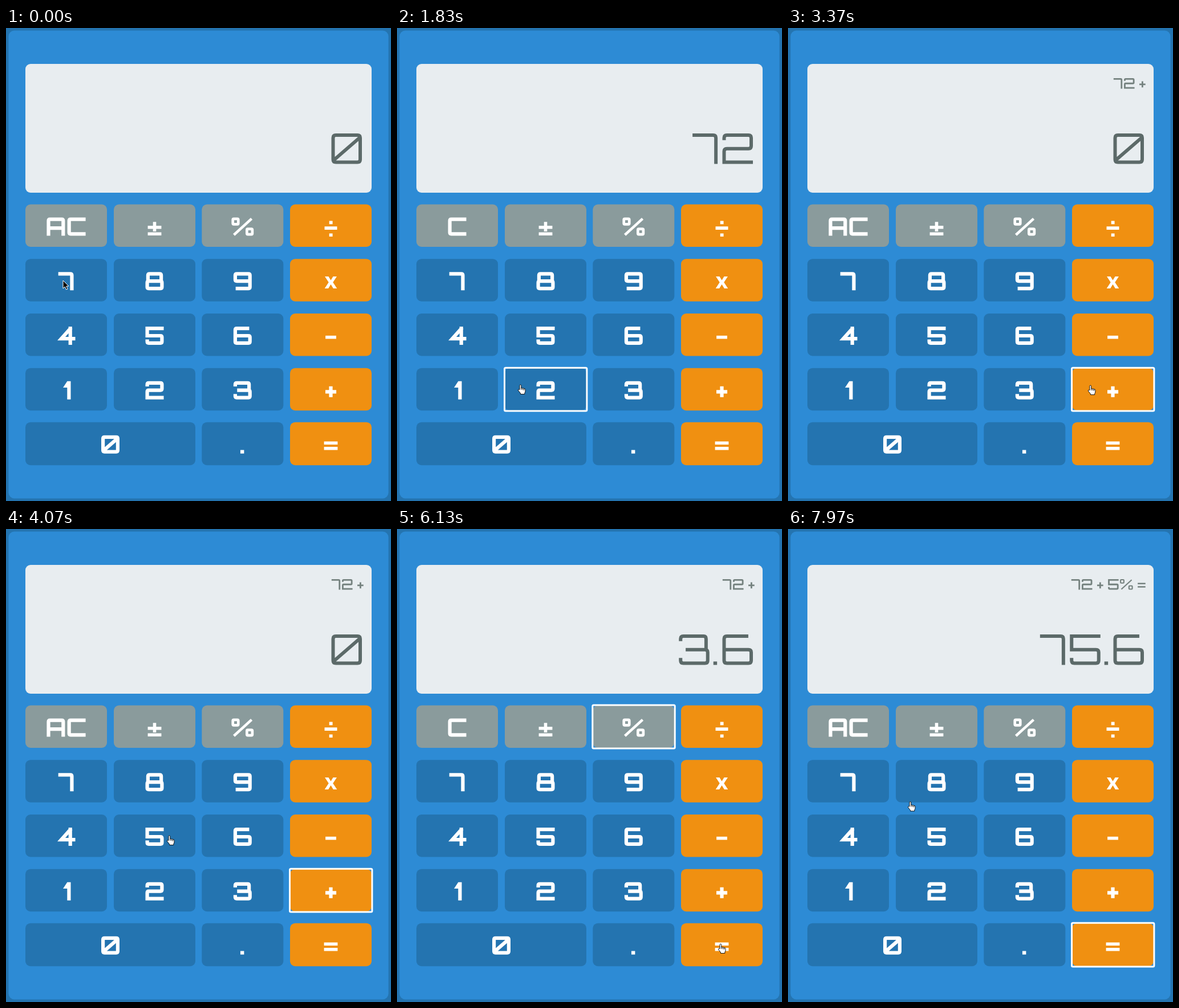
Write an HTML page that moves like this. It is 675 px wide and 830 px high and loops after 8 s.

```html
<!DOCTYPE html>
<html lang="en">
<head>
<meta charset="utf-8">
<title>Calculator</title>
<style>
html, body { margin: 0; width: 100%; height: 100%; overflow: hidden; background: #2474b0; }
svg { display: block; width: 100%; height: 100%; }
.ink { fill: none; stroke-linecap: square; stroke-miterlimit: 6; }
text { font: 700 38px "Open Sans", "Noto Sans", sans-serif; fill: #fff; text-anchor: middle; }
</style>
</head>
<body>
<svg viewBox="0 0 675 830">
  <rect width="675" height="830" fill="#2474b0"/>
  <rect x="4.5" y="4.5" width="666" height="821" rx="10" fill="#2d8bd5"/>
  <rect x="34" y="63" width="607" height="226" rx="9" fill="#e8edf0"/>
  <g id="history"></g>
  <g id="display"></g>
  <g id="keys"></g>
  <g id="clear"></g>
  <rect id="focus" fill="none" stroke="#fff" stroke-width="3" rx="2"/>
  <g id="pointer">
    <g id="press" fill="none">
      <circle r="26" stroke="#fff" stroke-opacity=".6" stroke-width="5"/>
      <circle r="26" stroke="#000" stroke-width="2.6"/>
    </g>
    <path id="arrow" d="M0 0V14L3.3 11 5.5 16 8 15 5.8 10H10Z" fill="#000" stroke="#fff"/>
    <g id="hand" stroke="#000" stroke-width=".9">
      <path fill="#fff" d="M-2 8.5V1.5a1.4 1.4 0 0 1 2.8 0V6q1.3-1 2.5.3 1.3-.8 2.3.5Q8 6.5 8 8.5V11q0 2-1.2 3.5v2H-.5V15L-4.3 10.2q-.8-1.8.8-2Z"/>
      <path d="M.8 6v3M3.3 6.3v3M5.6 6.8v3" fill="none"/>
    </g>
  </g>
</svg>
<script>
const LOOP = 8000;
const $ = id => document.getElementById(id);

// Centre lines in a unit square, with an optional width.
const BOWL = 'Q1 .5 1 .6V.9Q1 1 .9 1H.1Q0 1 0 .9V.87';
const BOX = 'M.1 0H.9Q1 0 1 .1V.9Q1 1 .9 1H.1Q0 1 0 .9V.1Q0 0 .1 0Z';
const GLYPHS = {
  0: [BOX + 'M.05 .9L.95 .12'],
  1: ['M.38 1V0H.33L.2 .2H.38', .38],
  2: ['M0 .12V.1Q0 0 .1 0H.9Q1 0 1 .1V.4Q1 .5 .9 .5H.1Q0 .5 0 .6V1H1'],
  3: ['M0 .12V.1Q0 0 .1 0H.85Q.94 0 .94 .1V.5M.25 .5H.9' + BOWL],
  4: ['M.78 0V1M1 .7H.17L.76 .04'],
  5: ['M1 0H0V.5H.9' + BOWL],
  6: ['M.83 0H.1Q0 0 0 .1V.9Q0 1 .1 1H.9Q1 1 1 .9V.6Q1 .5 .9 .5H0'],
  7: ['M0 0H.7Q.8 0 .8 .1V1', .83],
  8: ['M.05 .5V.1Q.05 0 .15 0H.85Q.95 0 .95 .1V.5M.1 .5H.9Q1 .5 1 .6V.9Q1 1 .9 1H.1Q0 1 0 .9V.6Q0 .5 .1 .5'],
  9: ['M.15 1H.9Q1 1 1 .9V.1Q1 0 .9 0H.1Q0 0 0 .1V.4Q0 .5 .1 .5H1'],
  A: ['M0 1V.1Q0 0 .1 0H.9Q1 0 1 .1V1M0 .6H1'],
  C: ['M1 0H.1Q0 0 0 .1V.9Q0 1 .1 1H1'],
  '%': ['M.06 0H.29Q.35 0 .35 .06V.29Q.35 .35 .29 .35H.06Q0 .35 0 .29V.06Q0 0 .06 0ZM.96 .65H1.19Q1.25 .65 1.25 .71V.94Q1.25 1 1.19 1H.96Q.9 1 .9 .94V.71Q.9 .65 .96 .65ZM.13 .97L1.14 .05', 1.25],
  '.': ['M0 1h.01', .06],
  '+': ['M0 .6H.5M.25 .35V.85', .5],
  '-': ['M0 .6H.5', .5],
  '=': ['M0 .41H.69M0 .77H.69', .69],
  '÷': ['M0 .6H.62M.31 .23h.01M.31 1.06h.01', .62],
  '±': ['M0 .55H.69M.345 .29V.72M0 .98H.69', .69]
};

// Draws a word; anchor is 1 for right aligned, .5 for centred.
function word(text, x, y, size, weight, color, anchor) {
  const gap = size * .13;
  let pen = 0, out = '';
  for (const ch of text) {
    if (ch === ' ') { pen += size * .2 + gap; continue; }
    const [d, width = 1] = GLYPHS[ch];
    const k = weight * (ch === '%' ? .75 : '=-÷±'.includes(ch) ? .9 : 1);
    const span = size - k;
    out += `<path d="${d}" stroke-width="${k / span}" transform="translate(${pen + k / 2} ${k / 2}) scale(${span})"/>`;
    pen += span * width + k + gap;
  }
  const left = x - (pen - gap) * anchor;
  return `<g class="ink" role="img" aria-label="${text}" stroke="${color}" transform="translate(${left} ${y})">${out}</g>`;
}
const label = (text, x, y) => word(text, x, y, 32, 6.2, '#fff', .5);

const COLS = [34, 189, 343.3, 498], ROWS = [309.5, 405.2, 501, 596.7, 691.7];
const LAYOUT = ['C±%÷', '789x', '456-', '123+', '0 .='];
const keys = {};
LAYOUT.forEach((row, r) => [...row].forEach((name, c) => {
  if (name !== ' ') keys[name] = { x: COLS[c], y: ROWS[r], w: name === '0' ? 298 : 143, h: r === 4 ? 75.5 : 74.5,
    fill: c === 3 ? '#f09011' : r ? '#2474b0' : '#8a9b9c' };
}));
$('keys').innerHTML = Object.entries(keys).map(([name, k]) => {
  const mid = k.x + k.w / 2;
  const face = name === 'C' ? '' : name === 'x' ? `<text x="${mid}" y="${k.y + 51.5}">x</text>` : label(name, mid, k.y + 23);
  return `<rect x="${k.x}" y="${k.y}" width="${k.w}" height="${k.h}" rx="9" fill="${k.fill}"/>${face}`;
}).join('');

// Pressing moves the focus, releasing updates the readout.
const CLICKS = [
  { key: '7', down: 890, up: 1010, display: '7', history: '', clear: 'C' },
  { key: '2', down: 1705, up: 1810, display: '72', history: '', clear: 'C' },
  { key: '+', down: 2930, up: 3060, display: '0', history: '72 +', clear: 'AC' },
  { key: '5', down: 4240, up: 4360, display: '5', history: '72 +', clear: 'C' },
  { key: '%', down: 5060, up: 5190, display: '3.6', history: '72 +', clear: 'C' },
  { key: '=', down: 6240, up: 6370, display: '75.6', history: '72 + 5% =', clear: 'AC' }
];
const START = { display: '0', history: '', clear: 'AC' };

const MOVES = [
  [0, 100, 443], [300, 102, 444], [1090, 102, 444], [1600, 217, 626], [1900, 217, 626],
  [2560, 539, 630], [3300, 539, 630], [3960, 287, 538], [4430, 287, 538], [4960, 397.5, 354],
  [5260, 397.5, 354], [5810, 568, 728], [6660, 568, 728], [7260, 184, 468], [7500, 215, 478.5], [LOOP, 215, 478.5]
];

function pointerAt(t) {
  const i = Math.max(1, MOVES.findIndex(m => m[0] > t));
  const [t0, x0, y0] = MOVES[i - 1], [t1, x1, y1] = MOVES[i];
  const p = (t - t0) / (t1 - t0), e = p * p * (3 - 2 * p);
  return [x0 + (x1 - x0) * e, y0 + (y1 - y0) * e];
}

const show = (id, on) => $(id).setAttribute('visibility', on ? 'visible' : 'hidden');
let shown;

function render(t) {
  const state = CLICKS.filter(c => t >= c.up).pop() || START;
  if (state !== shown) {
    $('display').innerHTML = word(state.display, 624, 185, 53.5, 6, '#5c6a69', 1);
    $('history').innerHTML = word(state.history, 626.7, 88, 18.5, 2.8, '#75827f', 1);
    $('clear').innerHTML = label(state.clear, 105.5, 332.5);
    shown = state;
  }

  const last = CLICKS.filter(c => t >= c.down).pop();
  show('focus', last);
  if (last) {
    const k = keys[last.key];
    const box = { x: k.x, y: k.y, width: k.w, height: k.h };
    for (const a in box) $('focus').setAttribute(a, box[a] + (a.length > 1 ? 1.4 : -.5));
  }

  const [x, y] = pointerAt(t);
  const over = t > 35 && Object.values(keys).some(k => x > k.x && x < k.x + k.w && y > k.y && y < k.y + k.h);
  $('pointer').setAttribute('transform', `translate(${x} ${y})`);
  show('hand', over);
  show('arrow', !over);
  show('press', last && t < last.up);
}

const begin = performance.now();
function tick() {
  render((performance.now() - begin) % LOOP);
  requestAnimationFrame(tick);
}
tick();
</script>
</body>
</html>
```
